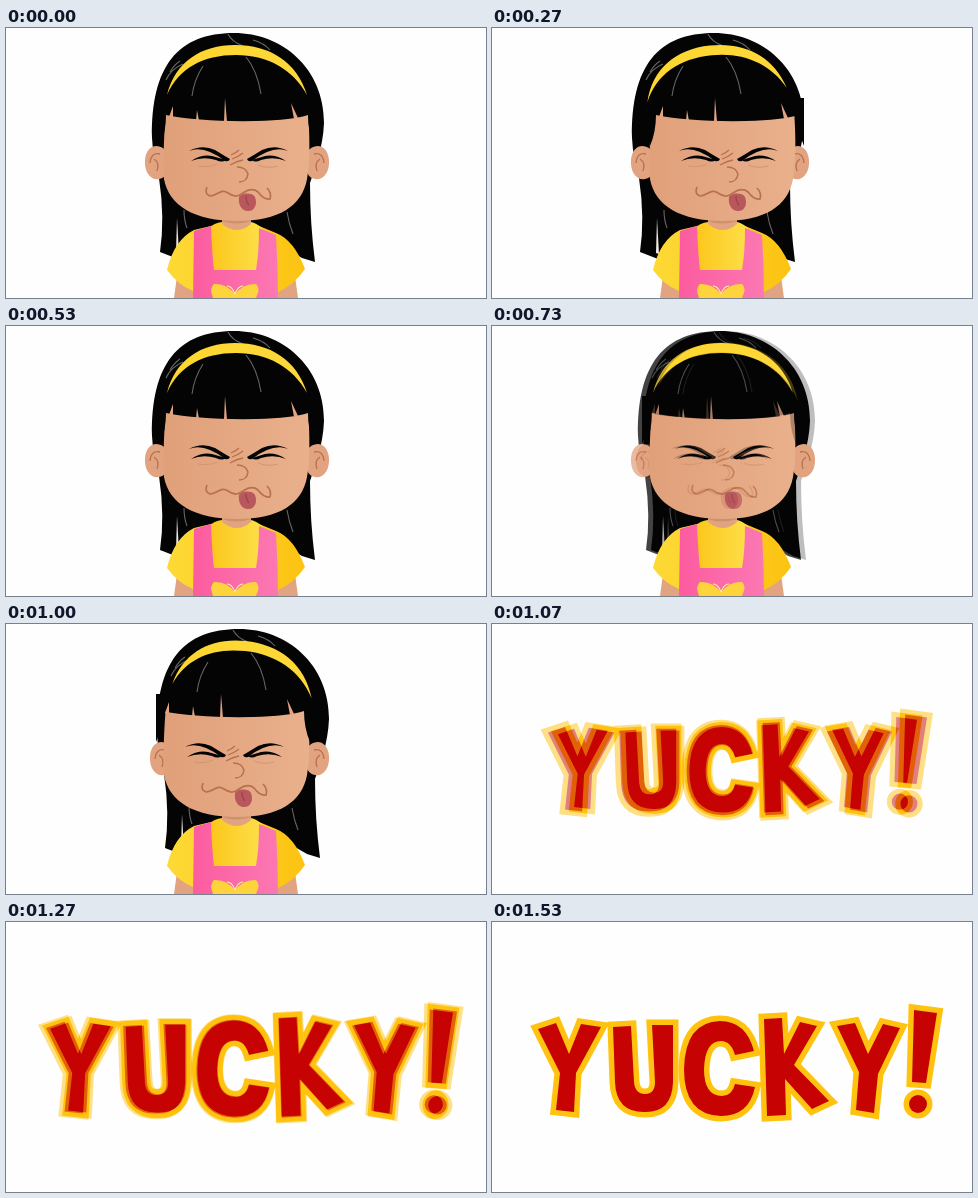
An HTML page with a canvas for the animation above (1.67 s loop, 480x270 px).

```html
<!DOCTYPE html>
<html lang="en">
<head>
<meta charset="utf-8">
<title>Yucky!</title>
<style>
html, body { margin: 0; height: 100%; overflow: hidden; background: #fefefe; }
canvas { display: block; width: 100vw; height: 100vh; }
</style>
</head>
<body>
<canvas id="stage" width="480" height="270"></canvas>
<script>
const LOOP = 1670, FRAME = 200 / 3, POSE = 261, WORD_START = 1066;
const TURNS = [0, 1, 0, -1, -1];
const POP = [.9, .95, 1.05, 1.1, 1.09, 1.06, 1.03, 1.01, 1];

const out = document.getElementById('stage').getContext('2d');
const layer = document.createElement('canvas');
layer.width = 480;
layer.height = 270;
const g = layer.getContext('2d');

function blend(x1, x2, from, to) {
  const paint = g.createLinearGradient(x1, 0, x2, 0);
  paint.addColorStop(0, from);
  paint.addColorStop(1, to);
  return paint;
}

const SKIN = '#e2a480', LINE = '#b8704f', HAIR = '#040404';
const FACE = blend(160, 302, '#e0a07a', '#e9b08c');
const BAND = blend(-70, 70, '#fdd62f', '#fed83a');
const SLEEVES = blend(165, 298, '#fdd935', '#fcc312');
const CHEST = blend(205, 252, '#fcc71c', '#fddd45');
const PINK = blend(187, 272, '#fc5c9f', '#fb78b2');

function fill(d, color) {
  g.fillStyle = color;
  g.fill(new Path2D(d));
}

function line(d, color, width) {
  g.strokeStyle = color;
  g.lineWidth = width;
  g.stroke(new Path2D(d));
}

function at(x, y, draw, degrees = 0) {
  g.save();
  g.translate(x, y);
  g.rotate(degrees * Math.PI / 180);
  draw();
  g.restore();
}

function ear(side) {
  g.save();
  g.scale(side, 1);
  fill('M11-10C4-20-10-18-11-2C-12 10-5 19 3 17Q9 16 11 10Z', SKIN);
  line('M4-8Q-5-10-6 1M-2-3Q4 1 1 9', LINE, 1.3);
  g.restore();
}

function hairBack() {
  fill('M146 110C145 38 172 5 228 5C276 5 318 40 318 95C317 120 309 140 304 155' +
    'Q304 195 309 234L296 230L270 215H190L172 231L154 224Q159 190 153 150Q147 130 146 110Z', HAIR);
  fill('M171 190L170 225L173 226Z', '#f4e9e2');
  line('M178 182Q178 192 181 200M281 184Q283 196 287 206', '#666', 1.1);
}

function hairShine() {
  line('M160 52Q165 41 177 36M164 44Q168 37 174 33M222 6Q226 14 237 18M247 12Q258 15 264 22' +
    'M240 29Q251 42 255 66M197 38Q188 52 186 68', '#666', 1.1);
}

function band() {
  fill('M-70 0C-62-33-36-50-2-50C33-50 60-33 70 0C56-26 30-40-1-40C-34-40-58-27-70 0Z', BAND);
}

function body() {
  fill('M171 248L168 270H190V255ZM289 248L292 270H270V255Z', SKIN);
  fill('M188 202L205 198H253L270 205Q288 212 299 241Q288 257 272 264' +
    'V270H187V263Q172 257 161 242Q168 212 188 202Z', SLEEVES);
  fill('M203 200Q208 195 216 194H245Q250 195 256 200V245H203Z', CHEST);
  fill('M216 186H245V196Q231 208 216 196Z', SKIN);
  fill('M216 189H245V193Q230 198 216 193Z', '#cf906c');
  fill('M188 203L205 198Q206 225 208 242H250Q253 225 253 200L270 207Q272 238 272 270H187Z', PINK);
  fill('M229 266Q220 255 208 256Q203 260 207 270H250Q255 260 250 256Q238 255 229 266Z', '#fdd43c');
  line('M229 266Q226 258 221 258M229 266Q232 258 237 258', '#fff0a0', 1.2);
}

function features() {
  // squeezed eyes
  fill('M183 123Q196 116 209 122Q217 127 224 131Q223 134 219 133Q198 117 183 123Z' +
    'M282 123Q269 116 256 122Q248 127 241 131Q242 134 246 133Q267 117 282 123Z', HAIR);
  fill('M185 133Q196 126 206 128L220 132Q216 135 210 132Q197 128 185 133Z' +
    'M280 133Q269 126 259 128L246 132Q249 135 255 132Q268 128 280 133Z', HAIR);
  line('M192 138Q203 140 211 136M252 137Q262 141 272 138', '#d29672', 1);
  // nose and wrinkles
  line('M225 127Q230 125 233 122M226 131Q232 129 237 125M224 137Q231 133 237 132', LINE, 1.3);
  line('M231 139Q240 139 242 146Q241 154 233 154', LINE, 1.5);
  // mouth
  fill('M233 169C235 165 246 164 249 169C252 177 248 184 241 183C235 182 232 176 233 169Z', '#b9585c');
  line('M240 168Q240 174 243 177', '#96434a', 1.2);
  line('M201 159Q198 166 204 168C211 168 215 160 222 165C229 170 233 168 237 165' +
    'Q246 159 252 164Q258 172 264 171Q266 165 261 160', LINE, 1.7);
}

function bangs() {
  fill('M154 70H308V118Q302 104 302 87Q287 92 250 93Q195 94 160 87Q160 104 154 118Z', HAIR);
  fill('M163 89L167 78L167 91ZM190 93L191 82L193 93ZM218 94L219 70L221 94ZM288 91L285 75L292 90Z', SKIN);
}

// turn: 1 tips the hair left and the face right, -1 the reverse
function girl(turn) {
  const hairX = turn > 0 ? -6 : -turn * 5;
  at(hairX, 0, hairBack);
  body();
  at(150 + Math.max(0, -turn) * 5, 134, () => ear(1));
  at(312 - Math.max(0, turn) * 6, 134, () => ear(-1));
  fill('M160 82H302C304 110 304 135 301 151C296 178 273 193 231 193' +
    'C189 193 163 178 158 151C157 130 158 105 160 82Z', FACE);
  at(turn * 4, 0, bangs);
  at(turn * 4, 0, features);
  at(hairX, 0, hairShine);
  at(231 + hairX, 67, band, -turn * 6);
}

const LETTERS = [
  'M46 107L64 101L77 132L89 102L109 105L84 151L82 190L64 188L68 151Z',
  'M121 105L139 104L142 160Q143 172 153 172Q163 172 163 160L160 103L181 103L181 160Q180 191 152 190Q124 190 123 160Z',
  'M262 129Q254 99 228 99Q193 100 192 147Q192 193 229 194Q257 194 263 165L243 162' +
    'Q240 174 230 174Q212 174 212 147Q213 119 229 119Q239 119 243 133Z',
  'M272 97L290 96L292 132L308 100L325 104L302 143L337 179L320 187L293 157L294 193L275 194Z',
  'M345 104L363 101L376 132L391 102L408 106L386 152L382 191L364 188L367 150Z',
  'M422 88L445 91L434 161L420 160Z',
  'M417 182A9 9 0 1 1 435 182A9 9 0 1 1 417 182Z'
];

function word(scale) {
  g.save();
  g.translate(245, 139);
  g.scale(scale, scale);
  g.translate(-245, -139);
  LETTERS.forEach(d => line(d, '#ffc20e', 11));
  LETTERS.forEach(d => fill(d, '#c60202'));
  g.restore();
}

function scene(t) {
  g.fillStyle = '#fefefe';
  g.fillRect(0, 0, 480, 270);
  if (t < WORD_START) {
    girl(TURNS[Math.floor(t / POSE)]);
  } else {
    const step = Math.floor((t - WORD_START) / (FRAME / 2));
    word(POP[Math.min(step, POP.length - 1)]);
  }
}

// Each picture averages four moments, which leaves ghosts at sudden changes.
const start = performance.now();
let shown = -1;
function render() {
  const now = (performance.now() - start) % LOOP;
  const frame = Math.min(24, Math.floor(now / FRAME + .06));
  if (frame !== shown) {
    shown = frame;
    for (let i = 0; i < 4; i++) {
      scene((frame + i / 4) * FRAME + .1);
      out.globalAlpha = 1 / (i + 1);
      out.drawImage(layer, 0, 0);
    }
  }
  requestAnimationFrame(render);
}
render();
</script>
</body>
</html>
```
